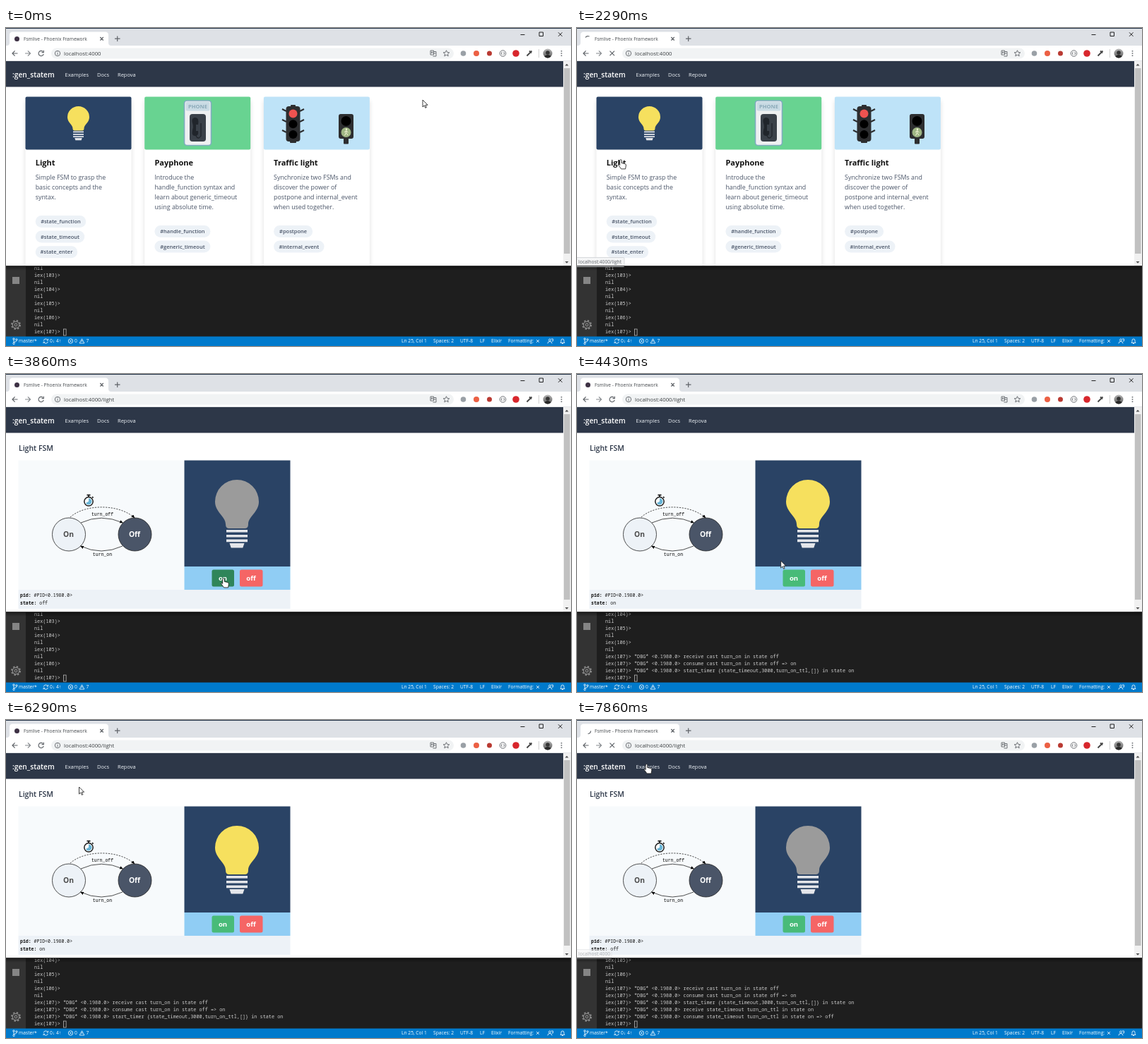
An HTML page for the animation above (8000 ms loop, 800 by 451 pixels).

```html
<!DOCTYPE html>
<html lang="en">
<head>
<meta charset="utf-8">
<title>FSM demo</title>
<style>
html, body { margin: 0; width: 800px; height: 451px; overflow: hidden; }
svg { display: block; }
text { font-family: "Open Sans", "Noto Sans", sans-serif; white-space: pre; }
.mono text, text.mono { font-family: "Noto Sans Mono", "DejaVu Sans Mono", monospace; }
.line { fill: none; stroke: #5f6368; stroke-width: 1.2; }
.mid { text-anchor: middle; }
.title { font-weight: 700; font-size: 11px; fill: #111; }
.body { font-size: 8.87px; fill: #4a5568; }
.tag { font-weight: 600; font-size: 7.5px; fill: #4a5568; }
.bar text { font-size: 6.7px; fill: #fff; }
.bar .line { stroke: #fff; stroke-width: .8; }
.edge text { font: 6.5px "Liberation Mono", monospace; }
</style>
</head>
<body>
<svg width="800" height="451" viewBox="0 0 800 451">
  <defs>
    <clipPath id="view"><rect y="47" width="789" height="290"/></clipPath>
    <filter id="soft" x="-20%" width="140%"><feGaussianBlur stdDeviation="3"/></filter>
    <linearGradient id="shade" x2="0" y2="1"><stop stop-opacity=".5"/><stop offset="1" stop-opacity="0"/></linearGradient>
    <linearGradient id="photo" x2="0" y2="1"><stop stop-color="#b9b9b9"/><stop offset="1" stop-color="#555"/></linearGradient>
    <clipPath id="round"><circle cx="767" cy="36" r="6.5"/></clipPath>
    <marker id="tip" markerWidth="6" markerHeight="6" refX="4.5" refY="2.2" orient="auto" markerUnits="userSpaceOnUse"><path d="M0 0L5 2.2 0 4.4z"/></marker>
    <g id="bulb">
      <path d="M-31 0A31 31 0 0 1 31 0C31 15 16 21 16 32Q16 38 11 38H-11Q-16 38-16 32C-16 21-31 15-31 0Z"/>
      <path fill="#e4e6ea" d="M-15 40h30v3.6h-30zM-15 47h30v3.6h-30zM-15 53.6h30v3.6h-30zM-10.5 59h21l-2.2 6.4h-16.6z"/>
    </g>
  </defs>

  <!-- editor -->
  <rect width="800" height="451" fill="#1e1e1e"/>
  <rect y="337" width="28" height="101" fill="#333"/>
  <rect x="9" y="353" width="10" height="10" fill="#858585"/>
  <g class="line" style="stroke:#8a8a8a"><circle cx="14" cy="421" r="4.6"/><circle cx="14" cy="421" r="1.8"/><circle cx="14" cy="421" r="6" stroke-dasharray="2.36" stroke-width="2"/></g>
  <g id="term" class="mono" fill="#ccc" font-size="6.84"></g>
  <rect x="81.5" y="427" width="3.6" height="9" fill="none" stroke="#ccc" stroke-width=".7"/>
  <g class="bar">
    <rect y="437.5" width="800" height="14" fill="#007acc"/>
    <g class="line">
      <circle cx="11" cy="441" r="1.2"/><circle cx="11" cy="447.500" r="1.2"/><circle cx="15" cy="442" r="1.2"/><path d="M11 442.200v4M15 443.200q0 2-4 2.500"/>
      <path d="M53.300 443.500a3 3 0 0 1 5.700-.8m.4 2a3 3 0 0 1-5.700.8M59.600 440.800v2.200h-2M53 447.300v-2h2"/>
      <circle cx="91.500" cy="444" r="3.200"/><path d="M90.200 442.700l2.600 2.600m0-2.600l-2.600 2.600M107.500 440.800l3.400 6.200h-6.800zM107.500 443v2"/>
      <path d="M751 442l4 4m0-4l-4 4M767 447.500q0-3 3-3t3 3M768.500 442.500a1.500 1.500 0 1 0 3 0a1.500 1.500 0 1 0-3 0M772 441h2.500v3h-1.500"/>
      <path d="M785 446.500h6l-1-1.500v-2q0-2-2-2t-2 2v2zM787 447.500h2"/>
    </g>
    <text x="18" y="446.400">master*</text><text x="62" y="446.400">0↓ 4↑</text><text x="97" y="446.400">0</text><text x="113.500" y="446.400">7</text>
    <text x="560" y="446.400">Ln 25, Col 1</text><text x="605" y="446.400">Spaces: 2</text><text x="643" y="446.400">UTF-8</text><text x="671" y="446.400">LF</text><text x="687" y="446.400">Elixir</text><text x="711" y="446.400">Formatting:</text>
  </g>
  <rect y="337" width="800" height="7" fill="url(#shade)"/>

  <!-- browser -->
  <rect width="800" height="337.500" fill="#fff"/>
  <rect width="800" height="25" fill="#dee1e6"/>
  <rect width="800" height="1" fill="#26354a"/>
  <path fill="#fff" d="M1 25q4 0 4-4v-11q0-4.500 4.500-4.500h131q4.500 0 4.500 4.500v11q0 4 4 4z"/>
  <circle id="icon" cx="15.500" cy="15.500" r="3.500" fill="#3d3144"/>
  <path id="spin" class="line" d="M0-4A4 4 0 0 1 4 0"/>
  <text x="25" y="17.700" font-size="6.600" fill="#45494d">Fsmlive - Phoenix Framework</text>
  <g class="line">
    <path d="M133.300 13l4.500 4.500m0-4.500l-4.500 4.500M154 15.200h7.500M157.700 11.500v7.500"/>
    <path stroke="#222" stroke-width="1" d="M728.500 9.500h6M755 6h5.500v5.500h-5.500zM782 6.300l5.500 5.500m0-5.500l-5.500 5.500"/>
    <path d="M16.500 36h-7.500m3.600-3.600l-3.600 3.600 3.600 3.600"/>
    <path stroke="#85898d" d="M27 36h7.500m-3.600-3.600l3.600 3.600-3.600 3.600"/>
    <path id="reload" d="M53.200 37a3.600 3.600 0 1 1-1-3.600M53.300 31.800v2.800h-2.800"/>
    <path id="stop" d="M46.500 32.700l6.500 6.500m0-6.500l-6.500 6.500"/>
  </g>
  <rect x="64" y="28.500" width="570" height="15" rx="7.500" fill="#f1f3f4"/>
  <g class="line" style="stroke-width:.9">
    <circle cx="73" cy="36" r="3.700"/><path d="M73 35.300v2.800M73 33.500v.9"/>
    <path d="M601 32h4.500v6h-4.500zM605.500 33.500h3.500v6.500h-4.500M602 36l1.200-2.500 1.200 2.500M606 36h2.500"/>
    <path d="M623.500 31.700l1.300 2.800 3 .3-2.300 2 .7 3-2.700-1.600-2.700 1.600.7-3-2.300-2 3-.3z"/>
    <circle cx="703.500" cy="36" r="4.300"/><path d="M702.500 34q-1 0-1 2t1 2M704.500 34q1 0 1 2t-1 2"/>
    <path stroke="#444" stroke-width="1.800" d="M737.500 39.500l4.500-4.500M741 32.500l3 3M742.500 34.500l2-2"/>
    <path stroke="#ccc" d="M754.500 30v12"/>
  </g>
  <circle cx="647.500" cy="36" r="3.800" fill="#9aa0a6"/><circle cx="666" cy="36" r="4" fill="#ec6044"/><circle cx="684.500" cy="36" r="3.500" fill="#b93a32"/><circle cx="722" cy="36" r="4.800" fill="#d8262c"/>
  <g clip-path="url(#round)"><rect x="760" y="29" width="14" height="14" fill="url(#photo)"/><circle cx="767" cy="35" r="2.800" fill="#343434"/><ellipse cx="767" cy="42.500" rx="5" ry="4.500" fill="#292929"/></g>
  <path stroke="#5f6368" stroke-width="1.600" stroke-dasharray="1.600" d="M786.500 32v8"/>
  <text id="url" x="82" y="38.800" font-size="7.800" fill="#3c4043"></text>
  <rect y="46" width="800" height="1" fill="#e3e5e8"/>

  <g clip-path="url(#view)">
    <rect y="47" width="789" height="36.500" fill="#2d3748"/>
    <text x="9" y="69.500" font-size="10.200" font-weight="600" fill="#fff">:gen_statem</text>
    <g font-size="7.500" fill="#edf2f7"><text x="83.500" y="68.500">Examples</text><text x="129" y="68.500">Docs</text><text x="158" y="68.500">Repova</text></g>

    <g id="home"></g>

    <g id="light">
      <text x="18" y="109" font-size="10.500" font-weight="600" fill="#2d3748">Light FSM</text>
      <rect x="17.500" y="122.500" width="235" height="183.500" fill="#f7fafc"/>
      <rect x="252.500" y="122.500" width="150" height="150.500" fill="#2a4365"/>
      <rect x="252.500" y="273" width="150" height="33" fill="#90cdf4"/>
      <rect x="17.500" y="306" width="385" height="27" fill="#edf2f7"/>
      <use id="lamp" href="#bulb" x="327" y="181"/>
      <rect id="on" x="291.500" y="277.500" width="31.500" height="24" rx="2.500"/>
      <rect x="331" y="277.500" width="32.500" height="24" rx="2.500" fill="#f56565"/>
      <g class="mid" font-weight="700" font-size="9.600" fill="#fff"><text x="307" y="293">on</text><text x="347" y="293">off</text></g>
      <g stroke="#222" stroke-width=".8" fill="none">
        <circle cx="89" cy="227.500" r="23.500" fill="#edf2f7"/><circle cx="182.500" cy="227.500" r="23.500" fill="#4a5568"/>
        <path marker-end="url(#tip)" stroke-dasharray="2.200 1.600" d="M91 203C112 184 160 184 182 204"/>
        <path marker-end="url(#tip)" d="M106 211Q135 197.500 165.500 211"/><path marker-end="url(#tip)" d="M165 244Q135 258 105.500 244"/>
      </g>
      <g class="mid" font-weight="700" font-size="10.300"><text x="88.500" y="231.300" fill="#4a4a4a">On</text><text x="182" y="231.300" fill="#fff">Off</text></g>
      <g class="edge mid"><text x="136.500" y="200.500">turn_off</text><text x="136.500" y="258">turn_on</text></g>
      <circle cx="117" cy="180.800" r="6.200" fill="#fff" stroke="#1c1c1c" stroke-width="1.500"/>
      <path fill="#69b5d6" d="M117 180.800V176.300A4.500 4.500 0 1 1 113 183z"/>
      <path stroke="#1c1c1c" stroke-width="1.700" d="M114.500 171.600h5M117 172v2.500M122 174.200l1.500 1.500"/>
      <g class="mono" font-size="6.500" fill="#111"><text x="20" y="316.300"><tspan font-weight="700">pid:</tspan> <tspan id="pid"></tspan></text><text x="20" y="326.800"><tspan font-weight="700">state:</tspan> <tspan id="state"></tspan></text></g>
    </g>
  </g>

  <rect x="789" y="47" width="11" height="290" fill="#f1f1f1"/><rect x="790" y="57" width="8.500" height="263" fill="#c1c1c1"/>
  <path fill="#505050" d="M791.500 53.500h5l-2.500-2.800zM791.500 331h5l-2.500 2.800z"/>
  <g id="status"><rect x="-2" y="325.500" height="13" rx="1.500" fill="#f4f5f6" stroke="#c9ccd0" stroke-width=".7"/><text x="2" y="334" font-size="6.700" fill="#5f6368"></text></g>
  <rect y="337" width="800" height="1" fill="#3a3a3a"/>
  <path id="pointer" stroke="#111" stroke-width=".8" fill="#fff"/>
</svg>
<script>
const $ = id => document.getElementById(id);
const show = (id, on) => $(id).style.display = on ? '' : 'none';
const disc = (x, y, r, fill) => `<circle cx="${x}" cy="${y}" r="${r}" fill="${fill}"/>`;
const box = (x, y, w, h, r, fill, more = '') => `<rect x="${x}" y="${y}" width="${w}" height="${h}" rx="${r}" fill="${fill}" ${more}/>`;

const bulb = '<use href="#bulb" transform="translate(102.500 126.500) scale(.5)" fill="#f6e05e"/>';
const phone = box(252.5, 103, 38, 63.5, 4, '#eef0f1', 'stroke="#7fabc0" stroke-width="1.600"')
  + box(254.5, 104.5, 34, 13, 2, '#c9dbe4')
  + '<text class="mid" x="271.500" y="113.800" font-size="7.600" font-weight="700" fill="#8aa9b8">PHONE</text>'
  + box(260, 122, 23, 39, 4, '#3a4149')
  + '<path d="M267 127q-5 1-3 8q2 4 0 10q-2 9 5 8q4-1 3-7h-3v-9h3q2-11-5-10z" fill="#20252b"/>'
  + '<path d="M269 153q3 6 7 0v-18" fill="none" stroke="#20252b" stroke-width="1.300"/>';
const dark = '#2d2e30';
const signals = '<path stroke="#2d2e30" stroke-width="2" d="M391 115l6 3m19 0l6-3M391 130l6 3m19 0l6-3M391 145l6 3m19 0l6-3"/>'
  + box(403, 109, 7, 4, 1, dark) + box(396.5, 111, 20, 50, 4, dark) + box(402, 160, 9, 3, 1, dark)
  + disc(406.5, 121.5, 6, '#ef5350') + disc(406.5, 136.3, 6, '#000') + disc(406.5, 151, 6, '#000')
  + box(478, 156, 7, 8.5, 1, dark) + box(471, 122, 21, 35, 3, dark)
  + disc(481.5, 132, 7, '#000') + disc(481.5, 148, 7, '#9fb684') + disc(482, 143.8, 1.2, '#f4f5d8')
  + '<path d="M482 145.500l-.5 3-2 4M481.500 148.500l2.500 3.500M479 148l2.500-2 3 2" fill="none" stroke="#f4f5d8"/>';

function card(x, color, art, title, lines, tags) {
  const left = x + 14.2;
  const text = lines.map((s, i) => `<text class="body" x="${left}" y="${215 + 14 * i}">${s}</text>`).join('');
  const pills = tags.map(([s, w], j) => {
    const y = 232.5 + 14 * lines.length + 21.6 * j;
    return box(left, y - 8.5, w, 17, 8.5, '#edf2f7') + `<text class="tag mid" x="${left + w / 2}" y="${y + 2.6}">${s}</text>`;
  }).join('');
  return box(x, 103, 150, 260, 2, '#000', 'opacity=".13" filter="url(#soft)"')
    + box(x, 97.5, 150, 260, 2, '#fff') + box(x, 97.5, 150, 75, 2, color)
    + art + `<text class="title" x="${left}" y="195.300">${title}</text>` + text + pills;
}

$('home').innerHTML =
  card(27.5, '#2a4365', bulb, 'Light',
    ['Simple FSM to grasp the', 'basic concepts and the', 'syntax.'],
    [['#state_function', 71.5], ['#state_timeout', 69.5], ['#state_enter', 59.5]])
  + card(196.2, '#68d391', phone, 'Payphone',
    ['Introduce the', 'handle_function syntax and', 'learn about generic_timeout', 'using absolute time.'],
    [['#handle_function', 79], ['#generic_timeout', 79]])
  + card(364.9, '#bee3f8', signals, 'Traffic light',
    ['Synchronize two FSMs and', 'discover the power of', 'postpone and internal_event', 'when used together.'],
    [['#postpone', 55], ['#internal_event', 71.5]]);

const history = [103, 104, 105, 106].flatMap(n => ['nil', `iex(${n})>`]).concat('nil');
const log = [
  'receive cast turn_on in state off',
  'consume cast turn_on in state off => on',
  'start_timer {state_timeout,3000,turn_on_ttl,[]} in state on',
  'receive state_timeout turn_on_ttl in state on',
  'consume state_timeout turn_on_ttl in state on => off'
].map(s => 'iex(107)> *DBG* <0.1980.0> ' + s);
$('term').innerHTML = Array.from({ length: 10 }, (_, i) => `<text x="40" y="${343.3 + 10 * i}"></text>`).join('');

const ARROW = 'M0 0v10l2.300-2.200 1.500 3.500 1.600-.7-1.500-3.400h3.200z';
const HAND = 'M-1.300.5q1.300-1.800 2.600 0v4l4.500 1q1.800.5 1.600 2.400l-.8 5h-6l-4-5.500q0-1.600 1.600-.6l.5.6z';

// pointer path: step, x, y
const path = [
  [5, 590, 102], [7, 480, 66], [9, 330, 61], [11, 150, 125], [13, 62, 187], [16, 62, 187],
  [20, 167, 187.5], [26, 308, 290], [30, 308, 290], [33, 250, 215], [37, 140, 108], [39, 103.5, 95],
  [45, 103.5, 95], [46, 103.5, 94], [48, 103.5, 94], [49, 103.5, 92.5], [50, 103.5, 92], [53, 98.5, 63]
];
function pointerAt(k) {
  const i = path.findIndex(p => p[0] >= k);
  if (i < 0) return path.at(-1).slice(1);
  if (!i) return path[0].slice(1);
  const [a, ...p] = path[i - 1], [b, ...q] = path[i];
  return p.map((v, j) => v + (q[j] - v) * (k - a) / (b - a));
}

function draw(k) {
  const within = (a, b) => k >= a && k < b;
  const home = k < 18, loading = within(14, 18) || k >= 54;
  show('home', home);
  show('light', !home);
  $('url').textContent = 'localhost:4000' + (home ? '' : '/light');

  show('icon', !loading);
  show('spin', loading);
  show('reload', !loading);
  show('stop', loading);
  $('spin').setAttribute('transform', `translate(15.500 15.500) rotate(${k * 50 - 860})`);

  const [label, width] = within(11, 18) ? ['localhost:4000/light', 69]
    : within(18, 22) ? ['Connexion', 267]
    : k >= 53 ? ['localhost:4000', 51] : ['', 0];
  show('status', label);
  $('status').style.opacity = k >= 55 ? .5 : 1;
  $('status').children[0].setAttribute('width', width);
  $('status').children[1].textContent = label;

  $('pid').textContent = k < 21 ? '#PID<0.1970.0>' : '#PID<0.1980.0>';
  $('state').textContent = within(30, 49) ? 'on' : 'off';
  $('lamp').setAttribute('fill', within(31, 50) ? '#f6e05e' : '#9b9b9b');
  $('on').setAttribute('fill', within(26, 31) ? '#2f855a' : '#48bb78');

  const count = k < 29 ? 0 : k < 48 ? 3 : 5;
  const rows = [...history, ...log.slice(0, count), 'iex(107)>'].slice(-10);
  rows.forEach((s, i) => $('term').children[i].textContent = s);

  const hand = within(11, 18) || within(26, 31) || k >= 53;
  $('pointer').setAttribute('d', hand ? HAND : ARROW);
  $('pointer').setAttribute('transform', `translate(${pointerAt(k)})`);
}

let last = -1;
function tick() {
  const k = Math.floor((performance.now() % 8000 + 5) * 7 / 1000) % 56;
  if (k !== last) draw(last = k);
  requestAnimationFrame(tick);
}
tick();
</script>
</body>
</html>
```
